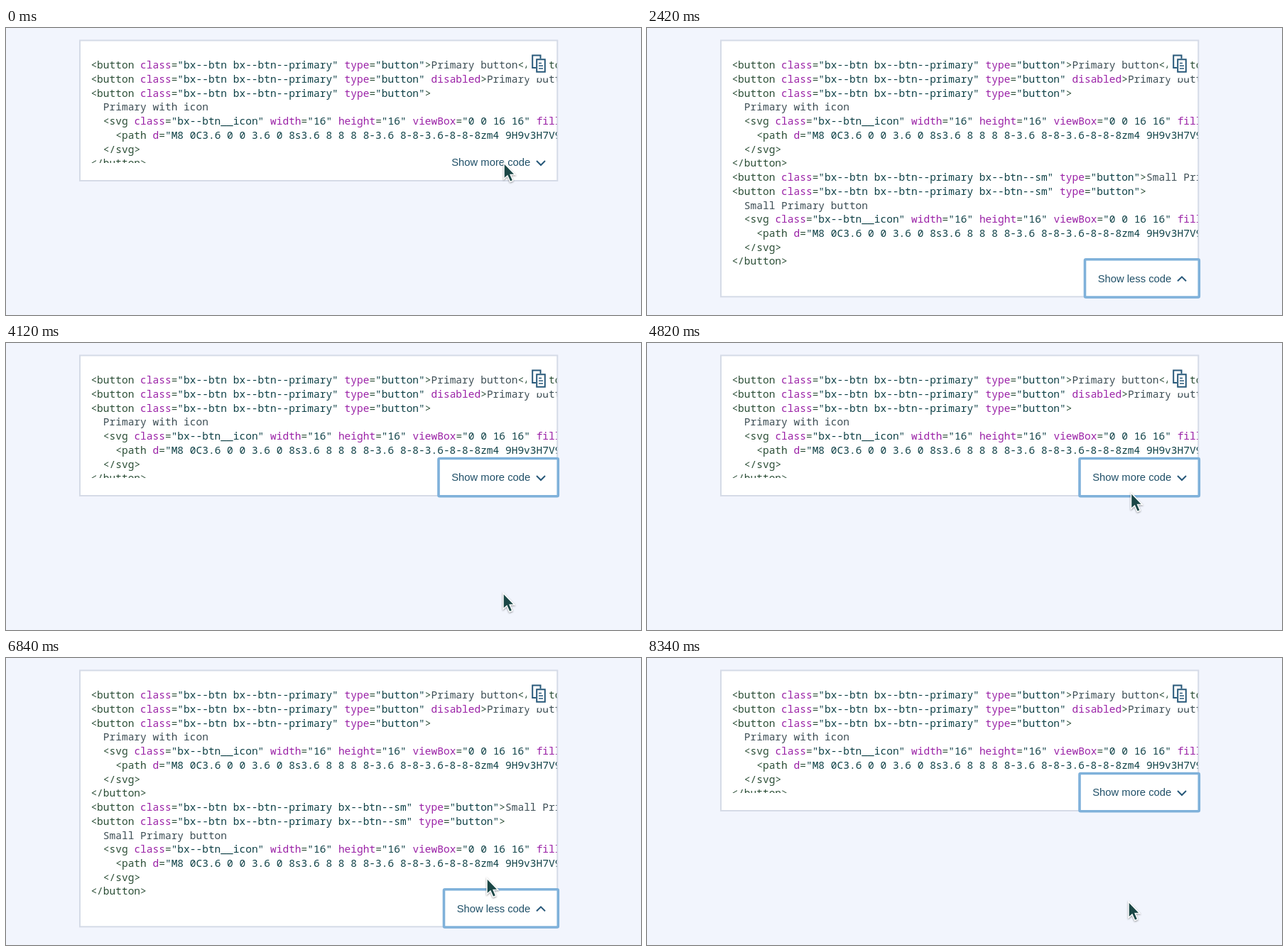
These frames come from a looping animation (894x404 px, 8360 ms). An HTML page:

```html
<!DOCTYPE html>
<html lang="en">
<head>
<meta charset="utf-8">
<title>Expandable code snippet</title>
<style>
  html, body { margin: 0; width: 100%; height: 100%; overflow: hidden; background: #f2f5fd; }
  svg { display: block; width: 894px; height: 404px; }
  #code text { font: 14.52px "Noto Sans Mono", "Liberation Mono", monospace; white-space: pre; fill: #3c4d54; font-variant-ligatures: none; }
  #code .tag { fill: #2a4d35; }
  #code .attr { fill: #9a20a6; }
  #code .str { fill: #0e4046; font-weight: 500; }
  #label { font: 14.8px "Liberation Sans", Arial, sans-serif; fill: #205068; text-anchor: end; }
  .line { fill: none; stroke: #28597a; stroke-width: 2; }
  #cursor { filter: drop-shadow(0 1px 1.2px rgba(0, 0, 0, .4)); }
</style>
</head>
<body>
<svg viewBox="0 0 894 404">
  <clipPath id="clip"><rect id="view" x="105" y="18" width="670.5"/></clipPath>
  <rect id="box" x="104" y="17.5" width="672.3" fill="#fff" stroke="#d5dbe7" stroke-width="2"/>
  <g clip-path="url(#clip)"><g id="code"></g></g>
  <rect x="733" y="34" width="32" height="36.5" fill="#fff"/>
  <g class="line">
    <path d="M746 56H741.2V38.6H752.5V43"/>
    <path d="M747.2 44.2H758.8V61.8H747.2Z" fill="#fff"/>
    <path d="M750 49.5H754M750 53.3H756M750 57H756" stroke-width="1.6"/>
  </g>
  <g id="button">
    <rect id="ring" y="162.5" height="53.2" rx="1.5" fill="#fff" stroke="#7fb1da" stroke-width="3.6"/>
    <text id="label" x="738.3" y="194.3"></text>
    <path id="chevron" class="line" d="M747 187l6 6 6-6"/>
  </g>
  <path id="cursor" d="M0 0V22.5L5 18 8.8 26.5 12.8 24.8 9.2 16.6H15.8Z" fill="#1b4746" stroke="#fff" stroke-width="1.5"/>
</svg>
<script>
const LOOP = 8360;
const GROW = 163.3;
const $ = id => document.getElementById(id);

const icon = [
  '  <svg class="bx--btn__icon" width="16" height="16" viewBox="0 0 16 16" fill="none">',
  '    <path d="M8 0C3.6 0 0 3.6 0 8s3.6 8 8 8 8-3.6 8-8-3.6-8-8-8zm4 9H9v3H7V9H4V7h3z">',
  '  </svg>',
  '</button>'
];
const primary = '<button class="bx--btn bx--btn--primary" type="button"';
const small = '<button class="bx--btn bx--btn--primary bx--btn--sm" type="button"';
const lines = [
  primary + '>Primary button</button>',
  primary + ' disabled>Primary button</button>',
  primary + '>',
  '  Primary with icon',
  ...icon,
  small + '>Small Primary button</button>',
  small + '>',
  '  Small Primary button',
  ...icon
];

function add(parent, name, attrs, text = '') {
  const el = document.createElementNS('http://www.w3.org/2000/svg', name);
  for (const key in attrs) el.setAttribute(key, attrs[key]);
  el.textContent = text;
  return parent.appendChild(el);
}

// Splits a line into tags, attributes, strings and plain text.
function drawLine(source, row) {
  const text = add($('code'), 'text', { x: 119.4, y: 57.2 + row * 19.73 });
  let inTag = false;
  for (const part of source.match(/<\/?\w+|>|"[^"]*"|[^<>"=\s]+|=|\s+/g)) {
    if (part[0] === '<') inTag = true;
    const kind = !inTag ? 'plain'
      : part[0] === '"' ? 'str'
      : /^\w/.test(part) ? 'attr' : 'tag';
    add(text, 'tspan', { class: kind }, part);
    if (part === '>') inTag = false;
  }
}
lines.forEach(drawLine);

const ramp = (t, start, length) => {
  const p = Math.min(1, Math.max(0, (t - start) / length));
  return p * p * (3 - 2 * p);
};

const clicks = [880, 3500, 5340, 7760];
// Alternates between 0 and 1 after each click.
const toggle = (t, delay, length) =>
  clicks.reduce((sum, at, i) => sum + (i % 2 ? -1 : 1) * ramp(t, at + delay, length), 0);

// Pointer stops: time, x, y.
const stops = [
  [0, 701, 190], [960, 701, 190], [1240, 698, 184], [2600, 698, 184],
  [3250, 700, 352], [4240, 700, 352], [4980, 679, 192], [5900, 679, 192],
  [6600, 677, 310], [6900, 677, 310], [7350, 678, 343], [LOOP, 678, 343]
];

function pointer(t) {
  const i = stops.findIndex(s => s[0] > t);
  const [t0, x0, y0] = stops[i - 1], [t1, x1, y1] = stops[i];
  const p = ramp(t, t0, t1 - t0);
  return [x0 + (x1 - x0) * p, y0 + (y1 - y0) * p];
}

function draw(t) {
  const shift = GROW * toggle(t, 90, 100);
  const open = clicks.filter(at => t >= at).length % 2 === 1;
  const left = open ? 616.5 : 609;

  $('box').setAttribute('height', 197.5 + shift);
  $('view').setAttribute('height', 172 + shift);
  $('button').setAttribute('transform', `translate(0 ${shift})`);
  $('ring').setAttribute('x', left);
  $('ring').setAttribute('width', 777.3 - left);
  $('ring').style.display = t >= clicks[0] ? '' : 'none';
  $('label').textContent = open ? 'Show less code' : 'Show more code';
  $('chevron').setAttribute('transform', `rotate(${180 * toggle(t, 0, 120)} 753 190)`);
  $('cursor').setAttribute('transform', `translate(${pointer(t)})`);
  $('cursor').style.display = t > 1800 && t < 2600 ? 'none' : '';
}

const begin = performance.now();
function frame() {
  draw((performance.now() - begin) % LOOP);
  requestAnimationFrame(frame);
}
frame();
</script>
</body>
</html>
```
